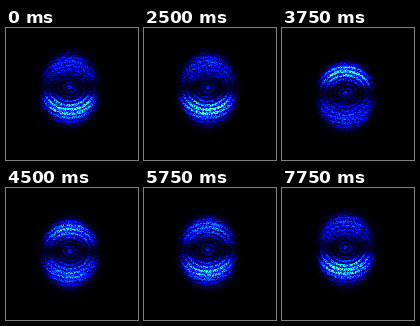
Recreate the animation shown at these times as an HTML page with a canvas. Size 132x132 px, loop 8000 ms.

```html
<!DOCTYPE html>
<html>
<head>
<meta charset="utf-8">
<style>
html, body { margin: 0; height: 100%; overflow: hidden; background: #000; }
canvas { display: block; width: 100vw; height: 100vh; image-rendering: pixelated; }
</style>
</head>
<body>
<canvas id="view" width="132" height="132"></canvas>
<script>
const SIZE = 132, STEP = 250, LOOP = 8000, PERIOD = 2625;
const ctx = document.getElementById('view').getContext('2d');
const image = ctx.createImageData(SIZE, SIZE);
const bell = x => Math.exp(-x * x);
const clamp = x => Math.max(0, Math.min(1, x));

function seededRandom(seed) {
  return () => {
    seed = (seed + 0x6D2B79F5) | 0;
    let t = Math.imul(seed ^ (seed >>> 15), 1 | seed);
    t ^= t + Math.imul(t ^ (t >>> 7), 61 | t);
    return ((t ^ (t >>> 14)) >>> 0) / 4294967296;
  };
}

// Mean signal at a pixel; swing runs from 1 (bright below) to -1 (bright above).
function density(x, y, swing) {
  const top = 28 - 5 * swing, bottom = 102 - 2 * swing;
  const dx = x - 63, dy = y - (62 - 3 * swing);
  const r = Math.hypot(0.87 * dx, dy) + 0.01;
  const q = Math.hypot(dx / 30, (2 * y - top - bottom) / (bottom - top));
  const edge = 1 / (1 + Math.exp((q - 0.94) / 0.07));
  const side = (1 + Math.sign(dy) * swing) / 2;
  const axial = Math.abs(dy / r) ** 1.5;
  const contrast = (0.3 + 0.4 * side) * bell(r / 36);
  const rings = 1 + contrast * Math.cos(2 * Math.PI * (r - 1) / 4.2);
  const hole = 1 - 0.6 * Math.exp(-(Math.hypot(dx / 20, dy / 12) ** 4));
  const waist = 1 - 0.55 * bell(dy / 7);
  const arcs = 0.27 * side * axial * bell((r - 23) / 7.5);
  const cap = 0.07 * (1 - side) * axial * bell((r - 27) / 9);
  const core = 0.08 * bell(dx / 7) * bell(dy / 5);
  return edge * rings * ((0.085 + arcs + cap) * hole * waist + core);
}

function draw(step) {
  const random = seededRandom(step * 7919 + 1);
  const swing = Math.cos(2 * Math.PI * step * STEP / PERIOD);
  for (let y = 0, i = 0; y < SIZE; y++) {
    for (let x = 0; x < SIZE; x++, i += 4) {
      const grain = 0.35 + 1.1 * random();
      const v = clamp(density(x, y, swing) * grain);
      const light = 255 * clamp(v / 0.12);
      for (let c = 0; c < 3; c++) {
        image.data[i + c] = light * clamp(1.5 - Math.abs(4 * v - 3 + c));
      }
      image.data[i + 3] = 255;
    }
  }
  ctx.putImageData(image, 0, 0);
}

let shown = -1;
function tick() {
  const step = Math.floor(performance.now() % LOOP / STEP);
  if (step !== shown) draw(shown = step);
  requestAnimationFrame(tick);
}
tick();
</script>
</body>
</html>
```
